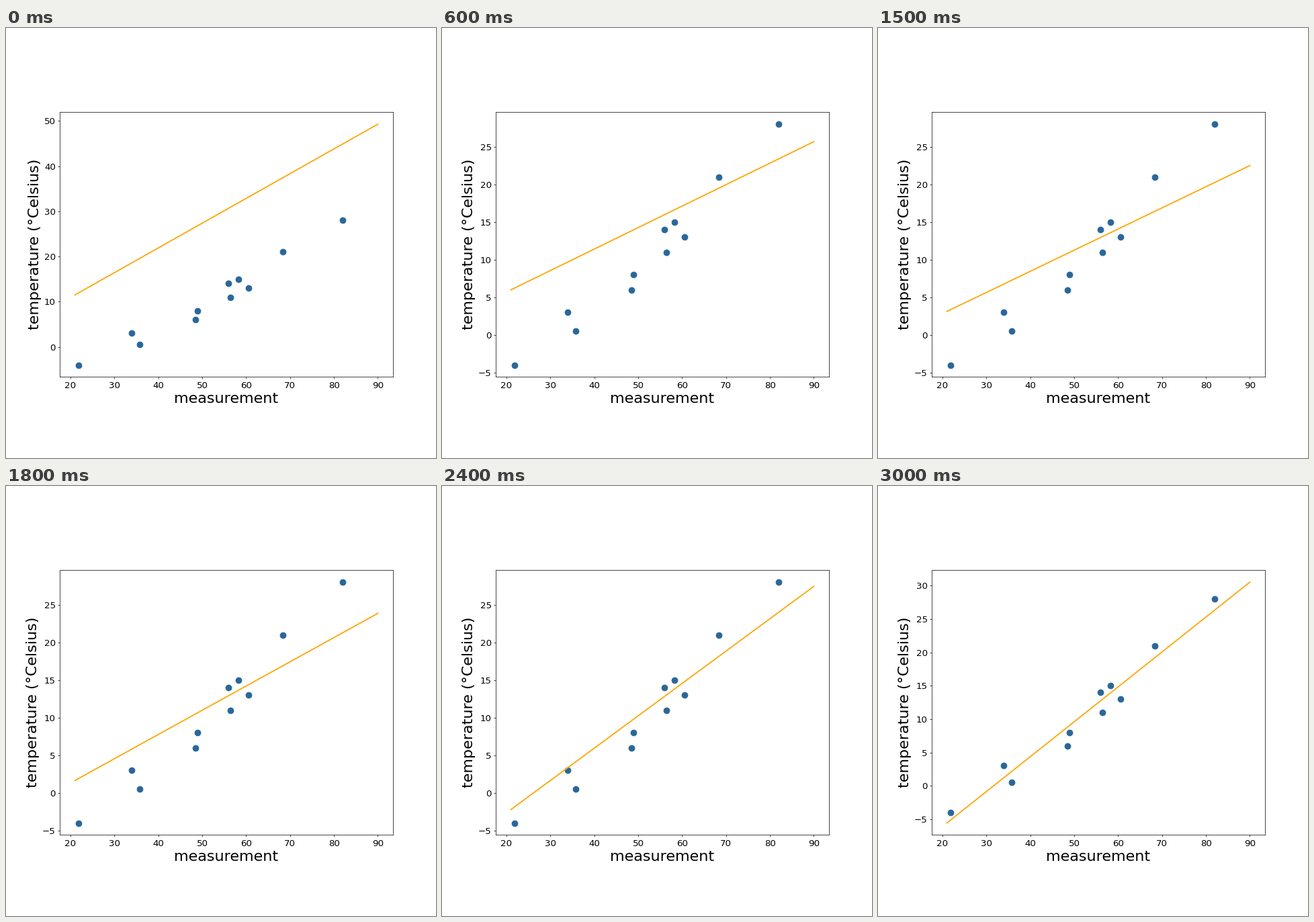
Recreate the animation shown at these times as a matplotlib script. Size 640 by 640 pixels, loop 3300 ms.

```python
import matplotlib.pyplot as plt
import numpy as np
from matplotlib.animation import FuncAnimation

X = np.array([21.8, 33.9, 35.7, 48.4, 48.9, 56, 56.4, 58.2, 60.5, 68.4, 81.9])
Y = np.array([-4, 3, 0.5, 6, 8, 14, 11, 15, 13, 21, 28])
LINE_X = np.array([21, 90])
RATE = 2e-4
MARGIN = 0.05

# Number of gradient descent steps taken at each stage of the loop
STEPS = [1, 2, 3, 4, 5, 10_000, 20_000, 40_000, 60_000, 80_000, 180_000]


def descent_map():
    """One gradient step as an affine map on (slope, offset, 1)."""
    mx, my = X.mean(), Y.mean()
    return np.array([
        [1 - RATE * (X * X).mean(), -RATE * mx, RATE * (X * Y).mean()],
        [-RATE * mx, 1 - RATE, RATE * my],
        [0, 0, 1],
    ])


STEP_MAP = descent_map()


def fit_after(steps):
    slope, offset, _ = np.linalg.matrix_power(STEP_MAP, steps) @ [1, 0, 1]
    return slope, offset


def padded(low, high):
    pad = MARGIN * (high - low)
    return low - pad, high + pad


plt.rcParams["font.family"] = "DejaVu Sans"
fig = plt.figure(figsize=(10, 10), dpi=64, facecolor="white")
ax = fig.add_axes([0.125, 0.1884, 0.775, 0.616])
ax.scatter(X, Y, s=100, color="#2a6799", snap=False)
line, = ax.plot([], [], color="orange", lw=2)
ax.set_xlim(padded(*LINE_X))
ax.tick_params(labelsize=15)
ax.set_xlabel("measurement", fontsize=25)
ax.set_ylabel("temperature (°Celsius)", fontsize=25)


def update(i):
    slope, offset = fit_after(STEPS[i])
    line_y = slope * LINE_X + offset
    line.set_data(LINE_X, line_y)
    ax.set_ylim(padded(min(Y.min(), line_y.min()), max(Y.max(), line_y.max())))
    return line,


anim = FuncAnimation(fig, update, frames=len(STEPS), interval=300,
                     repeat=True, repeat_delay=0, blit=False)
plt.show()
```
